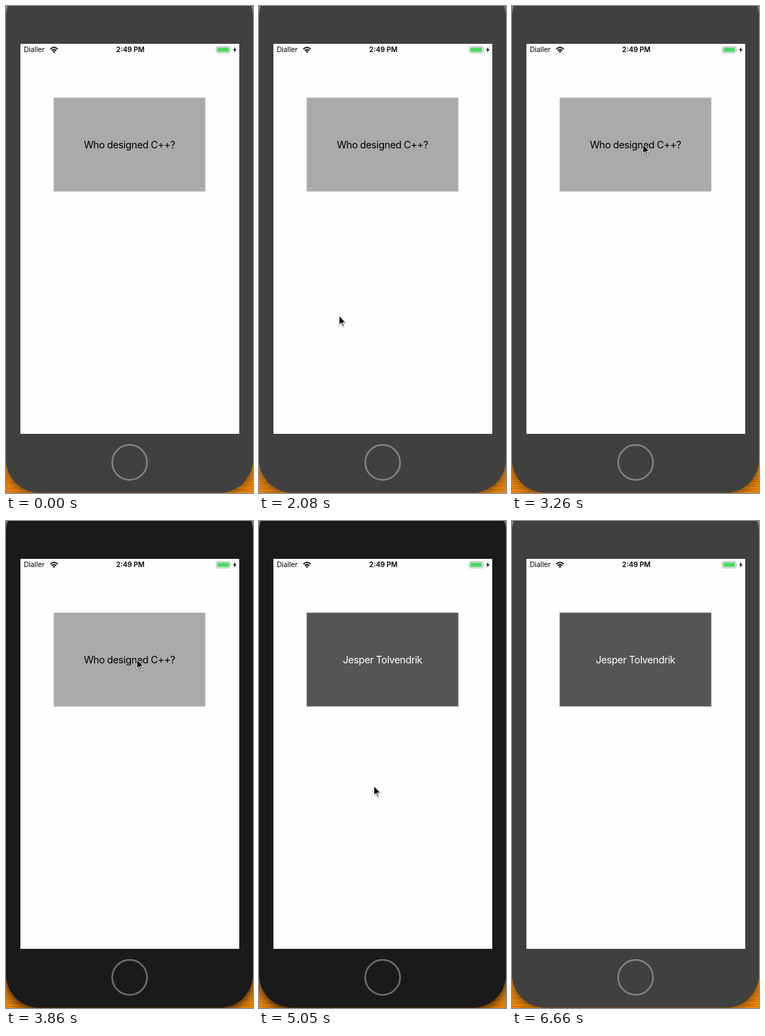
An HTML page that plays this animation: 360 px wide and 708 px high, repeating every 6760 ms.

```html
<!DOCTYPE html>
<html lang="en">
<head>
<meta charset="utf-8">
<title>Flash card</title>
<style>
  html, body { margin: 0; height: 100%; overflow: hidden; }
  svg { display: block; width: 100vw; height: 100vh; --body: #404040; --ring: #828282; --shadow: #0006; }
  svg.active { --body: #1a1a1a; --ring: #6c6c6c; --shadow: #000b; }
  text { font-family: Inter, Roboto, sans-serif; font-size: 10.2px; }
  .body { fill: var(--body); filter: drop-shadow(0 5px 7px var(--shadow)); }
  .ring { fill: none; stroke: var(--ring); stroke-width: 2.5; }
  #label { font-size: 14.4px; letter-spacing: -.35px; text-anchor: middle; }
  #cursor { stroke: #fff; filter: drop-shadow(0 1px 1px #0005); }
</style>
</head>
<body>
<svg viewBox="0 0 360 708">
  <defs>
    <pattern id="grain" width="60" height="7" patternUnits="userSpaceOnUse">
      <path d="M0 2Q15 0 30 2T60 2M0 5.5Q15 7 30 5.5T60 5.5" fill="none" stroke="#8f4206" stroke-opacity=".4"/>
    </pattern>
  </defs>

  <rect width="360" height="30" fill="#8ea5b8"/>
  <rect y="655" width="360" height="53" fill="#f08a0c"/>
  <rect y="655" width="360" height="53" fill="url(#grain)"/>
  <rect class="body" y="-33" width="360" height="740.5" rx="48"/>
  <circle class="ring" cx="180.2" cy="663.5" r="25.4"/>
  <rect x="21" y="55" width="319" height="567" fill="#fefefe"/>

  <text x="26" y="67.3">Dialler</text>
  <g fill="none" stroke="#000" stroke-width="1.8">
    <path d="M64.6 62.6Q70 57.6 75.4 62.6M66.8 65Q70 62 73.2 65"/>
    <path d="M68.2 66.3Q70 64.8 71.8 66.3L70 68.2Z" fill="#000" stroke="none"/>
  </g>
  <text x="181.3" y="67.3" text-anchor="middle" font-weight="600">2:49 PM</text>
  <rect x="306.5" y="59.2" width="20" height="9" rx="2" fill="none" stroke="#999" stroke-width=".8"/>
  <rect x="308" y="60.6" width="17" height="6.2" rx=".8" fill="#4cd964"/>
  <path d="M327.5 62.2q1.4 1.5 0 3z" fill="#999"/>
  <path d="M334.3 59.4L331 64.3H333.1L332.3 68L335.9 62.8H333.6Z"/>

  <rect id="card" x="69.5" y="133.3" width="221" height="136.3"/>
  <text id="label" x="180" y="207"></text>
  <path id="cursor" d="M.8 1.2V14.6L3.9 11.7L6.3 17.2L8 16.4L5.8 11.2H10.2Z"/>
</svg>
<script>
  // The screen refreshes in ticks; all other times are counted in them
  const LOOP = 6760, TICK = 148, LEAD = 4;
  const SHOW = 8, ACTIVE = 26, FLIP = 27, HIDE = 41, IDLE = 45;

  // Pointer strokes: first and last tick, then start, bend and end
  const strokes = [
    { from: 8, to: 10, path: [[155, 655], [138, 597], [125, 540]] },
    { from: 11, to: 19, path: [[125, 540], [102, 399], [138, 363]] },
    { from: 19, to: 22, path: [[138, 363], [160, 255], [190, 200]] },
    { from: 32, to: 37, path: [[190, 200], [131, 420], [221, 690]] },
    { from: 37, to: 40, path: [[221, 690], [250, 760], [281, 706]] }
  ];

  const $ = id => document.getElementById(id);
  const svg = document.querySelector("svg");

  function pointer(tick) {
    const { from, to, path: [a, b, c] } = strokes.findLast(s => s.from <= tick);
    const u = Math.min(1, (tick - from) / (to - from)), v = 1 - u;
    return a.map((p, i) => v * v * p + 2 * u * v * b[i] + u * u * c[i]);
  }

  function draw() {
    const tick = Math.floor((performance.now() % LOOP + LEAD) / TICK);
    const flipped = tick >= FLIP, shown = tick >= SHOW && tick < HIDE;
    svg.classList.toggle("active", tick >= ACTIVE && tick < IDLE);
    $("card").setAttribute("fill", flipped ? "#555" : "#aaa");
    $("label").setAttribute("fill", flipped ? "#fff" : "#000");
    $("label").textContent = flipped ? "Jesper Tolvendrik" : "Who designed C++?";
    $("cursor").setAttribute("visibility", shown ? "visible" : "hidden");
    if (shown) $("cursor").setAttribute("transform", `translate(${pointer(tick)})`);
    requestAnimationFrame(draw);
  }
  draw();
</script>
</body>
</html>
```
